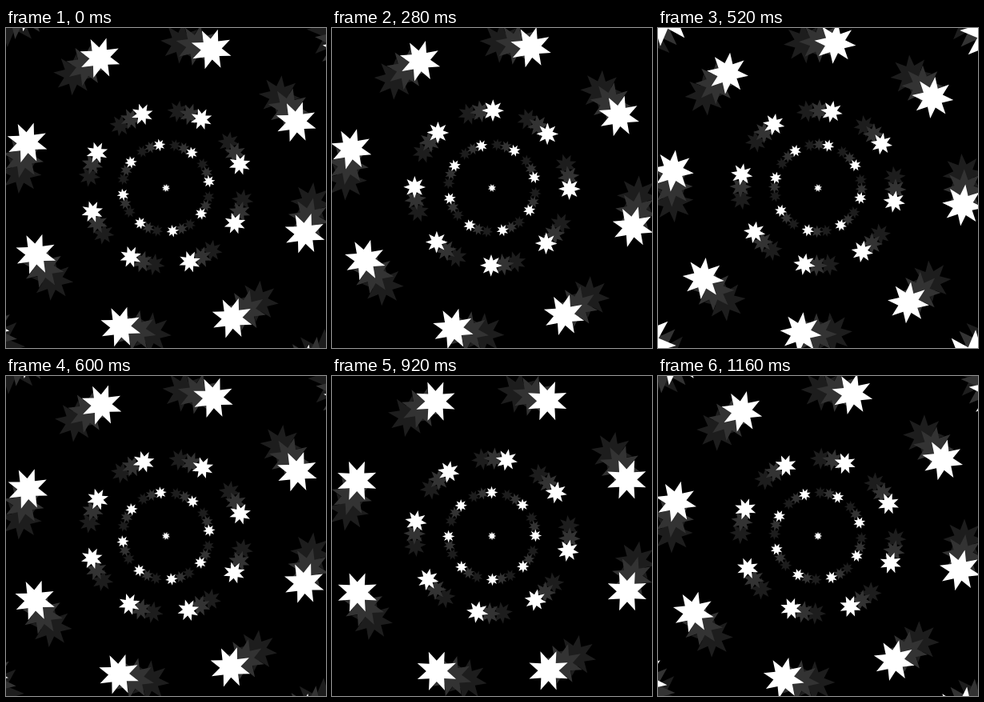
Write an HTML page with a canvas that moves like this. It is 400 by 400 pixels and loops after 1200 ms.

```html
<!DOCTYPE html>
<html lang="en">
<head>
<meta charset="utf-8">
<title>Star rings</title>
<style>
html, body { margin: 0; height: 100%; overflow: hidden; background: #000; }
canvas { display: block; width: 400px; height: 400px; }
</style>
</head>
<body>
<canvas id="stage" width="400" height="400"></canvas>
<script>
const ctx = document.getElementById('stage').getContext('2d');
const RAD = Math.PI / 180;
const STEP_MS = 40, STEPS = 30;
const TURN = 360 / 119, START = 20.3;
const SIZE = 0.143, INNER = 0.5;
const SHADES = ['#1d1d1d', '#333', '#fff'];
// Inner rings turn faster: 4, 3, 2, 1 times the base angle.
const RINGS = [54.4, 96.8, 182.5, 293].map((radius, i) => ({
  radius, speed: 4 - i, phase: 11.25 * i
}));

function star(x, y, r, angle) {
  ctx.beginPath();
  for (let i = 0; i < 16; i++) {
    const a = (angle + i * 22.5) * RAD;
    const d = i % 2 ? r * INNER : r;
    ctx.lineTo(x + d * Math.cos(a), y + d * Math.sin(a));
  }
  ctx.fill();
}

function drawRings(base) {
  star(200, 200, 5.2, base * 5);
  for (const { radius, speed, phase } of RINGS) {
    const turn = base * speed + phase;
    for (let i = 0; i < 8; i++) {
      const deg = turn + i * 45, a = deg * RAD;
      star(200 + radius * Math.cos(a), 200 + radius * Math.sin(a), radius * SIZE, deg);
    }
  }
}

function draw(step) {
  ctx.fillStyle = '#000';
  ctx.fillRect(0, 0, 400, 400);
  SHADES.forEach((shade, i) => {
    ctx.fillStyle = shade;
    drawRings(START + (step - 2 + i) * TURN);
  });
}

function tick(now) {
  draw(Math.floor(now / STEP_MS) % STEPS);
  requestAnimationFrame(tick);
}
draw(0);
requestAnimationFrame(tick);
</script>
</body>
</html>
```
